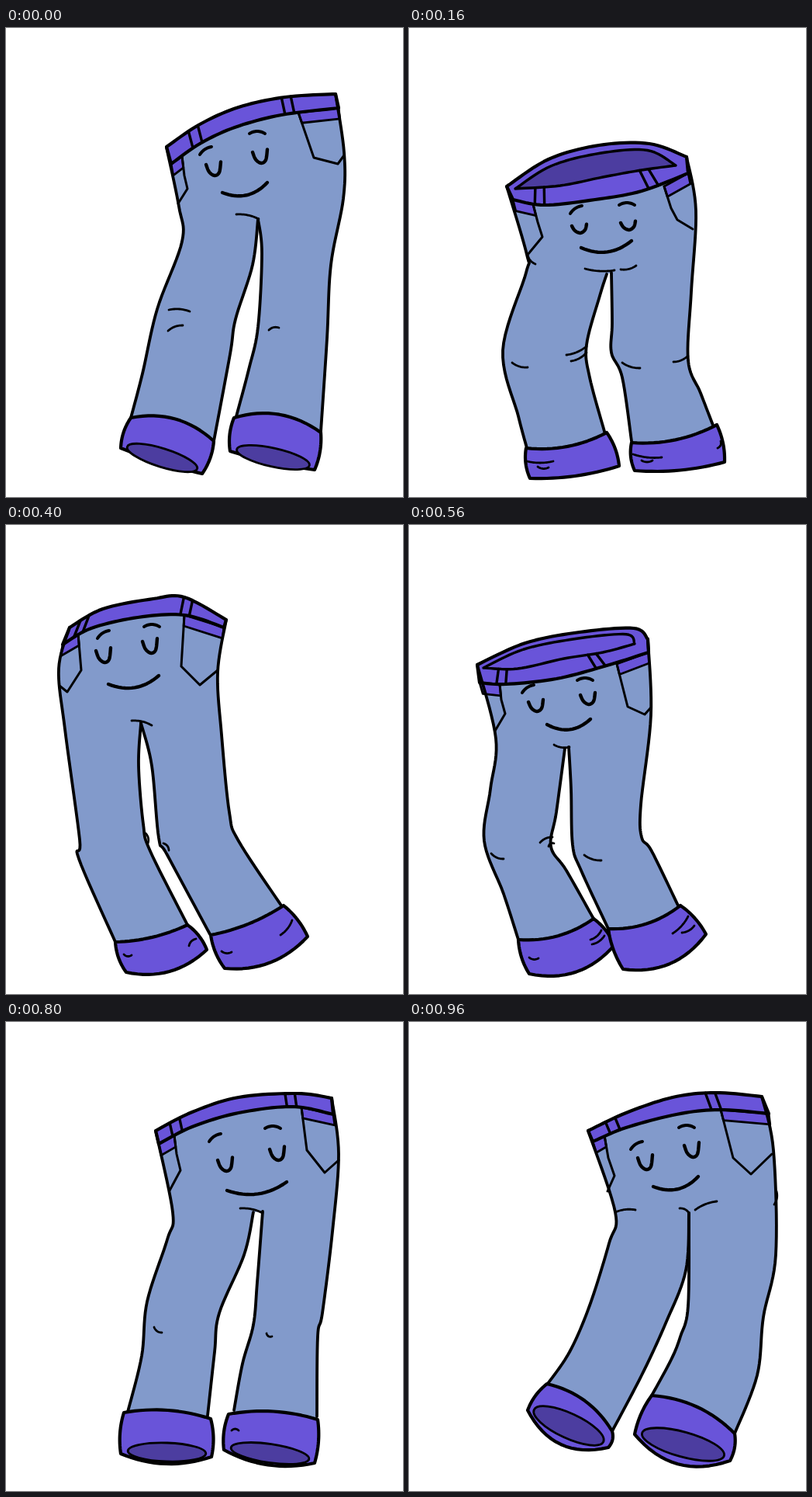
These frames come from a looping animation (512x604 px, 1.04 s). An HTML page with a canvas:

```html
<!DOCTYPE html>
<html lang="en">
<head>
<meta charset="utf-8">
<title>Dancing jeans</title>
<style>
html, body { margin: 0; width: 100%; height: 100%; overflow: hidden; background: #fff; }
canvas { display: block; }
</style>
</head>
<body>
<canvas id="stage" width="512" height="604"></canvas>
<script>
const ctx = document.getElementById('stage').getContext('2d');
const DENIM = '#829acb', PURPLE = '#6954d9', DARK = '#4c3da0';
const STEP = 80;

const lerp = (a, b, t) => a + (b - a) * t;
const between = (p, q, t) => ({ x: lerp(p.x, q.x, t), y: lerp(p.y, q.y, t) });
const shift = (p, x, y) => ({ x: p.x + x, y: p.y + y });
const back = pts => pts.slice().reverse();

// A pose is a few key points: seams, cuff corners, and where the face sits.
// bulge: bow of the cuffs' top and bottom edges; loops: belt loop positions.
const pose = spec => Object.fromEntries(Object.entries(spec).map(([key, v]) => [key,
  typeof v !== 'string' ? v : v.split(' ').map(p => {
    const [x, y] = p.split(',').map(Number);
    return { x, y };
  })]));

const swayRight = pose({
  waist: '207,153 250,124 300,102 360,89 425,85',
  band: '213,175 250,149 295,128 355,112 429,103',
  outL: '207,154 223,230 227,275 195,362 176,445 161,502',
  inL: '268,532 289,420 296,375 318,305 325,246',
  inR: '325,246 330,290 325,385 313,440 297,500',
  outR: '425,85 436,160 435,220 419,305 414,400 406,520',
  cuffL: '161,502 268,532 253,574 148,541',
  cuffR: '294,502 406,521 398,569 289,545',
  pocketL: '227,165 230,190 234,207 222,226',
  pocketR: '377,109 397,167 428,175 436,164',
  face: '257,157 324,134 269,190 329,174 279,212 337,199',
  marks: '297,240 326,246 210,363 237,365 209,390 228,383 339,389 352,386',
  bulge: [14, 2], loops: [.13, .68], eye: 14, hole: 12
});

const dipCentre = pose({
  waist: '126,204 180,169 245,151 310,149 358,166',
  front: '137,207 195,203 250,192 300,183 344,177',
  band: '134,221 175,228 240,221 300,210 360,187',
  outL: '126,204 152,292 151,315 121,415 141,500 152,541',
  inL: '253,523 233,450 229,408 246,345 255,317',
  inR: '261,315 262,380 261,418 275,450 287,532',
  outR: '358,166 370,235 364,340 360,428 376,470 393,514',
  cuffL: '151,541 255,521 271,564 156,580',
  cuffR: '287,534 397,511 407,559 291,570',
  pocketL: '160,227 166,250 172,269 153,292',
  pocketR: '329,204 338,232 346,247 366,259',
  face: '215,233 281,226 221,264 284,260 222,283 287,274',
  marks: '265,312 227,310 293,306 273,311 163,304 153,292 153,437 133,431 229,410 203,421 229,418 209,429 298,438 275,431 360,422 341,430 186,558 152,558 180,566 166,565 326,553 289,549 314,557 300,557 402,532 398,541',
  bulge: [-8, 5], loops: [.125, .775], eye: 9
});

const swayLeft = pose({
  waist: '82,132 125,108 190,95 230,93 284,122',
  band: '73,154 110,133 170,119 230,116 281,132',
  outL: '82,132 68,185 76,263 95,405 94,430 141,537',
  inL: '234,515 186,420 177,385 171,310 174,255',
  inR: '174,255 188,310 197,403 208,425 263,527',
  outR: '284,122 273,190 278,270 288,370 300,407 355,490',
  cuffL: '141,537 234,515 259,547 155,576',
  cuffR: '264,528 358,490 389,530 282,571',
  pocketL: '93,140 97,187 79,215 69,207',
  pocketR: '230,116 226,182 250,206 273,187',
  face: '125,140 188,129 127,177 187,165 132,205 197,194',
  marks: '162,252 188,258 162,554 152,553 236,542 245,533 291,550 278,549 369,509 354,528 180,397 183,410 203,410 210,419',
  bulge: [-5, 14], loops: [.07, .73], eye: 15
});

const dipLeft = pose({
  waist: '88,180 150,152 220,138 290,133 308,147',
  front: '96,184 140,185 200,172 250,164 291,153',
  band: '91,203 125,205 190,198 255,181 309,164',
  outL: '88,180 112,275 105,340 97,407 122,475 141,534',
  inL: '238,507 203,445 183,414 190,370 201,288',
  inR: '206,286 209,340 211,412 222,445 257,520',
  outR: '308,147 312,245 299,360 300,402 313,420 347,490',
  cuffL: '141,534 238,507 265,541 155,578',
  cuffR: '257,520 350,490 383,527 276,572',
  pocketL: '117,205 119,225 124,243 111,265',
  pocketR: '268,179 282,234 304,244 312,235',
  face: '153,210 227,198 165,240 232,231 178,257 234,250',
  marks: '207,286 187,283 122,430 106,423 169,409 185,402 180,414 187,410 248,432 226,425 167,558 155,557 252,529 236,540 248,522 234,534 360,504 340,526 368,516 352,525',
  bulge: [-9, 17], loops: [.1, .69], eye: 12, lit: true
});

const dipLow = pose({
  waist: '136,208 165,178 235,161 300,158 356,174',
  front: '146,207 195,207 245,200 300,191 343,179',
  band: '141,226 175,228 240,222 300,213 357,201',
  outL: '136,208 161,285 161,315 126,415 127,445 149,533',
  inL: '244,514 230,475 213,427 223,395 258,306',
  inR: '261,306 256,345 245,406 258,445 279,520',
  outR: '356,174 361,265 353,345 347,398 352,415 375,506',
  cuffL: '147,535 249,511 262,567 152,577',
  cuffR: '273,520 380,507 388,556 275,571',
  pocketL: '165,228 168,250 173,271 157,280',
  pocketR: '320,211 325,259 348,280 360,268',
  face: '207,235 275,229 217,267 275,260 223,283 283,275',
  marks: '231,303 262,306 159,447 136,442 215,422 194,426 215,429 196,434 297,443 267,437 348,397 332,407 351,407 337,421 168,558 152,556 250,547 239,552 294,550 280,548 377,540 366,543',
  bulge: [-5, 6], loops: [.12, .74], eye: 14
});

const riseRight = pose({
  waist: '193,140 240,116 300,97 375,92 420,98',
  band: '197,157 240,135 300,117 370,109 422,119',
  outL: '193,140 215,245 208,280 182,360 175,430 157,502',
  inL: '260,507 269,425 275,375 307,300 319,245',
  inR: '331,244 324,335 319,390 305,440 294,500',
  outR: '420,98 429,170 421,270 408,375 402,405 401,508',
  cuffL: '152,503 264,511 265,560 148,556',
  cuffR: '287,505 402,512 398,568 281,551',
  pocketL: '217,146 220,170 225,191 211,217',
  pocketR: '381,110 388,165 411,194 429,178',
  face: '269,148 344,135 284,192 351,178 285,217 362,206',
  marks: '302,240 331,246 201,400 191,393 343,405 336,401 291,526 300,526',
  bulge: [7, 11], loops: [.08, .735], eye: 14, hole: 12
});

const farRight = pose({
  waist: '231,140 280,117 340,97 395,91 455,96',
  band: '237,154 280,136 345,119 400,113 464,118',
  outL: '231,140 266,245 258,285 233,365 207,425 178,467',
  inL: '262,527 300,455 331,388 357,320 361,246',
  inR: '361,246 360,365 350,405 338,435 313,481',
  outR: '455,96 470,165 473,300 457,380 449,455 420,530',
  cuffL: '178,466 262,527 257,548 153,500',
  cuffR: '313,481 420,530 414,565 291,531',
  pocketL: '252,146 257,175 265,198 256,218',
  pocketR: '402,113 418,175 441,196 468,170',
  face: '293,158 358,134 306,190 366,174 315,212 373,199',
  marks: '266,245 292,242 349,240 361,246 369,242 397,231 474,218 471,235',
  bulge: [11, 22], loops: [.1, .675], eye: 15, hole: 16
});

function blend(a, b, t) {
  if (typeof a === 'number') return lerp(a, b, t);
  return a.map((p, i) => typeof p === 'number' ? lerp(p, b[i], t) : between(p, b[i], t));
}

// In-between pose; a closed waist opens from its own top edge.
function mix(a, b, t) {
  const out = { marks: [], lit: a.lit || b.lit };
  for (const key in a) {
    if (key !== 'marks' && key !== 'lit' && key !== 'front' && b[key]) out[key] = blend(a[key], b[key], t);
  }
  if (a.front || b.front) out.front = blend(a.front || a.waist, b.front || b.waist, t);
  return out;
}

// Catmull-Rom curve through the points, as a dense polyline.
function smooth(pts, n = 10) {
  const out = [], at = i => pts[Math.max(0, Math.min(pts.length - 1, i))];
  const axis = (a, b, c, d, t) =>
    b + t / 2 * (c - a + t * (2 * a - 5 * b + 4 * c - d + t * (3 * (b - c) + d - a)));
  for (let k = 0; k <= (pts.length - 1) * n; k++) {
    const i = Math.floor(k / n), t = k / n - i;
    const [a, b, c, d] = [at(i - 1), at(i), at(i + 1), at(i + 2)];
    out.push({ x: axis(a.x, b.x, c.x, d.x, t), y: axis(a.y, b.y, c.y, d.y, t) });
  }
  return out;
}

// Parabola from p to q, bowed to the left of its direction by h.
function arc(p, q, h, n = 16) {
  const dx = q.x - p.x, dy = q.y - p.y, len = Math.hypot(dx, dy);
  return Array.from({ length: n + 1 }, (_, i) => {
    const t = i / n, k = 4 * h * t * (1 - t) / len;
    return shift(between(p, q, t), dy * k, -dx * k);
  });
}

function pointAt(line, u) {
  const x = lerp(line[0].x, line[line.length - 1].x, u);
  const i = Math.max(1, line.findIndex(p => p.x >= x)), p = line[i - 1], q = line[i];
  return between(p, q, (x - p.x) / (q.x - p.x));
}

function towards(p, q, dist) {
  return between(p, q, dist / Math.hypot(q.x - p.x, q.y - p.y));
}

function trace(pts, width, fill) {
  ctx.beginPath();
  for (const p of pts) ctx.lineTo(p.x, p.y);
  if (fill) {
    ctx.closePath();
    ctx.fillStyle = fill;
    ctx.fill();
  }
  if (!width) return;
  ctx.lineWidth = width;
  ctx.stroke();
}

function drawPocket(pocket, corner, side, depth) {
  trace([corner, pocket[0], towards(pocket[0], pocket[1], depth), towards(corner, side, depth)], 2.8, PURPLE);
  trace(pocket, 3);
}

function drawCuff([tl, tr, br, bl], [top, bottom], hole) {
  trace([...arc(tl, tr, top), ...arc(tr, br, 3), ...arc(br, bl, bottom), ...arc(bl, tl, 3)], 4.2, PURPLE);
  if (!hole) return;
  const mid = between(bl, br, .5), dx = br.x - bl.x, dy = br.y - bl.y;
  ctx.beginPath();
  ctx.ellipse(mid.x + 1, mid.y - 4, .43 * Math.hypot(dx, dy), hole, Math.atan2(dy, dx), 0, 7);
  ctx.fillStyle = DARK;
  ctx.fill();
  ctx.lineWidth = 2.8;
  ctx.stroke();
}

function drawFace([browL, browR, eyeL, eyeR, smileL, smileR], d) {
  trace(arc(shift(browL, -7, 6), shift(browL, 8, -4), 2), 4);
  trace(arc(shift(browR, -10, 2), shift(browR, 10, 2), 3), 4);
  for (const e of [eyeL, eyeR]) {
    trace(smooth([shift(e, -11, -d), shift(e, -7, -d / 3), e, shift(e, 6, -4), shift(e, 8, -1.25 * d)]), 4.4);
  }
  trace(arc(smileL, smileR, -10), 4.4);
}

function draw(p) {
  ctx.fillStyle = '#fff';
  ctx.fillRect(0, 0, 512, 604);
  ctx.strokeStyle = '#000';
  ctx.lineCap = ctx.lineJoin = 'round';

  const [waist, band, outL, inL, inR, outR] =
    [p.waist, p.band, p.outL, p.inL, p.inR, p.outR].map(s => smooth(s));
  const tuck = ([tl, tr, br, bl]) => [between(tl, bl, .5), between(tr, br, .5)];
  trace([...outL, ...tuck(p.cuffL), ...inL, ...inR, ...tuck(p.cuffR),
    ...back(outR), ...back(waist)], 0, DENIM);

  drawPocket(p.pocketL, p.band[0], p.outL[1], 15);
  drawPocket(p.pocketR, p.band[4], p.outR[1], 14);
  trace([...waist, ...back(band), waist[0]], 4.2, PURPLE);
  const edge = p.front ? smooth(p.front) : waist;
  if (p.front) {
    const inner = p.waist.map((q, i) => between(q, p.front[i], i % 4 ? .25 : 1));
    trace([...smooth(inner), ...back(edge)], 3.4, p.lit ? PURPLE : DARK);
  }
  for (const u of p.loops.flatMap(v => [v, v + .055])) trace([pointAt(edge, u), pointAt(band, u)], 3.4);

  for (const seam of [outL, inL, inR, outR]) trace(seam, 3.8);
  drawCuff(p.cuffL, p.bulge, p.hole);
  drawCuff(p.cuffR, p.bulge, p.hole);
  for (let i = 0; i < p.marks.length; i += 2) trace(arc(p.marks[i], p.marks[i + 1], 2), 2.8);
  drawFace(p.face, p.eye);
}

const beats = [
  swayRight, mix(swayRight, dipCentre, .55),
  dipCentre, dipCentre, mix(dipCentre, swayLeft, .6),
  swayLeft, mix(swayLeft, dipLeft, .5),
  dipLeft, dipLow, dipLow,
  riseRight, mix(riseRight, farRight, .5),
  farRight
];

function tick() {
  draw(beats[Math.floor(performance.now() / STEP) % beats.length]);
  requestAnimationFrame(tick);
}
tick();
</script>
</body>
</html>
```
